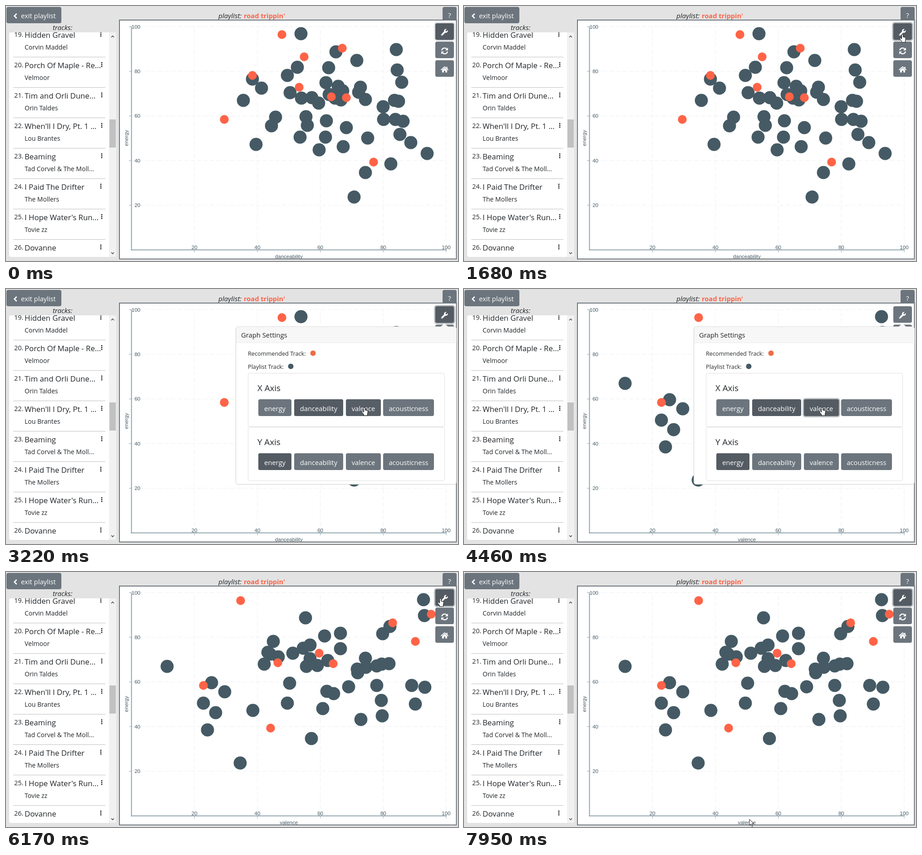
An HTML page for the animation above (8 s loop, 996 px wide and 562 px high).

```html
<!DOCTYPE html>
<html lang="en">
<head>
<meta charset="utf-8">
<title>Playlist graph</title>
<style>
html, body { margin: 0; width: 100%; height: 100%; overflow: hidden; background: #e3e3e3; }
svg { display: block; width: 100vw; height: 100vh; font-family: "Open Sans", "Noto Sans", sans-serif; fill: #212529; }
.chart { font: 11.55px "Liberation Sans", sans-serif; fill: #455a64; }
</style>
</head>
<body>
<svg id="stage" viewBox="0 0 996 562"></svg>
<script>
const LOOP = 8000;
const GREY = '#6c757d', DARK = '#545b62', SLATE = '#455a64', TOMATO = '#ff6347';

// Dot positions on the stage: one shared energy (y), two choices for x.
const playlist = {
  energy: [61, 96, 101, 120, 135, 136, 141, 153, 161, 168, 169, 177, 181, 179, 191, 187, 190, 195, 203, 202, 208, 203, 206, 207, 208,
    210, 214, 222, 245, 244, 250, 250, 253, 254, 264, 263, 268, 283, 289, 289, 291, 301, 305, 310, 317, 325, 348, 367, 421],
  danceability: [650, 860, 727, 773, 642, 711, 862, 620, 543, 872, 705, 732, 563, 781, 626, 742, 777, 712, 651, 674, 523, 725, 792, 738, 856,
    865, 689, 831, 594, 661, 832, 858, 706, 875, 585, 664, 750, 868, 648, 704, 797, 892, 551, 743, 690, 928, 848, 792, 767],
  valence: [920, 922, 660, 846, 737, 830, 702, 589, 670, 655, 737, 577, 582, 632, 670, 600, 792, 709, 569, 844, 355, 828, 686, 817, 662,
    793, 774, 775, 625, 453, 817, 894, 755, 923, 482, 707, 722, 827, 435, 620, 902, 698, 544, 462, 829, 782, 444, 673, 516]
};
const recommended = {
  energy: [63, 93, 112, 153, 179, 200, 202, 250, 344],
  danceability: [608, 741, 657, 543, 646, 717, 750, 481, 810],
  valence: [517, 937, 852, 902, 690, 599, 721, 435, 583]
};

const tracks = [
  ['Hidden Gravel', 'Corvin Maddel'],
  ['Porch Of Maple - Re...', 'Velmoor'],
  ['Tim and Orli Dune...', 'Orin Taldes'],
  ["When'll I Dry, Pt. 1 ...", 'Lou Brantes'],
  ['Beaming', 'Tad Corvel & The Moll...'],
  ['I Paid The Drifter', 'The Mollers'],
  ["I Hope Water's Run...", 'Tovie zz'],
  ['Dovanne', '']
];

// Cursor waypoints: time, x, y
const route = [
  [70, 861, 522], [810, 950, 112], [1210, 966, 62], [2380, 966, 62], [2460, 928, 77],
  [3220, 790, 261], [5000, 789, 261], [5480, 925, 74], [5790, 957, 58], [6250, 957, 58],
  [6620, 625, 496], [6700, 622, 499], [6900, 617, 544], [7150, 634, 546], [7480, 612, 543],
  [7700, 633, 543], [7950, 629, 545], [8000, 629, 545]
];

const text = (x, y, size, content, extra = '') =>
  `<text x="${x}" y="${y}" font-size="${size}" ${extra}>${content.replace(/&/g, '&amp;')}</text>`;
const rect = (x, y, w, h, fill, extra = '') =>
  `<rect x="${x}" y="${y}" width="${w}" height="${h}" fill="${fill}" ${extra}/>`;
const line = (x1, y1, x2, y2, stroke, extra = '') =>
  `<path d="M${x1} ${y1}L${x2} ${y2}" stroke="${stroke}" ${extra}/>`;
const dot = (x, y, r, fill) => `<circle cx="${x}" cy="${y}" r="${r}" fill="${fill}"/>`;
const middle = 'text-anchor="middle"';

const buttons = {};
function button(id, x, y, w, h, content) {
  buttons[id] = { x, y, w, h };
  return `<g id="${id}">
    ${rect(x - 1.4, y - 1.4, w + 2.8, h + 2.8, 'none', 'class="ring" rx="5" stroke="#828a91" stroke-opacity=".55" stroke-width="2.9" opacity="0"')}
    ${rect(x, y, w, h, GREY, 'rx="4"')}
    ${rect(x, y, w, h, DARK, 'class="dark" rx="4" opacity="0"')}
    <g fill="#fff">${content}</g></g>`;
}

function sidebar() {
  const rows = tracks.map(([title, artist], i) => {
    const top = 45 + 67 * i;
    const dotsX = /\.\.\.$/.test(title + artist) || title.endsWith('...') ? 211 : 209;
    return text(18, top + 22.5, 14.4, `${19 + i}.`) +
      text(41, top + 25, 16.8, title) +
      text(41, top + 51, 14, artist) +
      [13, 17, 21].map(y => dot(dotsX, top + y, 1.5, '#212529')).join('') +
      line(16, top + 67.5, 219, top + 67.5, '#bfbfbf');
  }).join('');
  return `<clipPath id="list"><rect x="7" y="58" width="236" height="495" rx="4"/></clipPath>
    <g clip-path="url(#list)">
      ${rect(7, 58, 236, 495, '#fff')}${rows}
      ${rect(227, 58, 16, 495, '#f1f1f1')}${rect(228, 250, 14, 62, '#c1c1c1')}
      <path d="M232 69l3-3 3 3M232 543l3 3 3-3" fill="none" stroke="#505050" stroke-width="1.6"/>
    </g>`;
}

function dots(axis) {
  const draw = (set, r, fill) => set[axis].map((x, i) => dot(x, set.energy[i], r, fill)).join('');
  return `<g id="${axis}Dots">${draw(playlist, 14.4, SLATE)}${draw(recommended, 9.7, TOMATO)}</g>`;
}

function chart() {
  const ticks = [20, 40, 60, 80, 100];
  const toX = v => 276.5 + 6.935 * v, toY = v => 537.5 - 4.92 * v;
  const grid = 'stroke-dasharray="9.6 4.8"', axis = 'stroke-width="2"';
  return `<g class="chart">
    ${rect(250, 31, 742.5, 526.5, '#fff', 'stroke="#6c757d" stroke-width="2"')}
    ${ticks.map(v =>
      line(toX(v), 537, toX(v), 45, '#eceff1', grid) + line(277, toY(v), 970, toY(v), '#eceff1', grid) +
      line(toX(v), 537, toX(v), 543, '#90a4ae') + line(271, toY(v), 277, toY(v), '#90a4ae')).join('')}
    ${line(276.5, 45, 276.5, 538.5, '#90a4ae', axis)}${line(275.5, 537.5, 970.5, 537.5, '#90a4ae', axis)}
    ${dots('danceability')}${dots('valence')}
    ${ticks.map(v => text(toX(v), 536, 11.55, `${v}`, middle) +
      text(296, toY(v) + 4, 11.55, `${v}`, 'text-anchor="end"')).join('')}
    ${text(623.3, 555.5, 11.55, '', middle + ' id="xLabel"')}
    ${text(0, 0, 11.55, 'energy', middle + ' transform="translate(268.5 291) rotate(-90)"')}
  </g>`;
}

const icons = {
  wrench: `<path transform="translate(958.5 50.5) scale(.0295)" d="M488 104L413 178 345 167 334 99 408 24C420 10 410 2 402 3
    310-20 200 70 232 185L19 403c-50 60 30 140 90 90L322 280c110 35 220-70 186-171-2-9-13-12-20-5zM64 472a24 24 0 1 1 .1 0z"/>`,
  refresh: [0, 180].map(a => `<g transform="translate(966.5 99) rotate(${a})">
    <path d="M-6.3-1.2A6.4 6.4 0 0 1 4.6-4.4" fill="none" stroke="#fff" stroke-width="2.3"/><path d="M7.4-7.4V-1.2H1.2z"/></g>`).join(''),
  home: `<path d="M958.5 141l8-7 8 7" fill="none" stroke="#fff" stroke-width="1.8"/>
    <path d="M961 141l5.5-4.8 5.5 4.8v5.5h-3.8v-4h-3.4v4H961zM970.5 134h2.2v5l-2.2-2z"/>`
};

function panel() {
  const choices = [['energy', 556, 73], ['danceability', 635, 108], ['valence', 749, 77], ['acousticness', 831, 112]];
  const card = (axis, y) =>
    rect(533.5, y + .5, 433, 118, '#fff', 'rx="4" stroke="#dfdfdf"') + text(554, y + 40, 18.7, `${axis} Axis`) +
    choices.map(([name, x, w]) => button(axis + name, x, y + 58, w, 37,
      text(x + w / 2, y + 83.5, 14.7, name, middle))).join('');
  return `<g id="panel">
    ${rect(506.5, 83, 486, 347.5, '#fff', 'rx="5" stroke="#ccc"')}
    <path d="M507 118V88q0-4.500 4.500-4.500H988q4.500 0 4.500 4.500V118z" fill="#f7f7f7"/>
    ${line(507, 118.5, 992, 118.500, '#ebebeb')}
    <path d="M957 84l9-8.500 9 8.500z" fill="#f7f7f7"/>
    ${text(518, 107, 14.8, 'Graph Settings')}
    ${text(533, 147, 12.7, 'Recommended Track:')}${dot(676.5, 141.5, 6, '#ee6c45')}
    ${text(533, 176, 12.7, 'Playlist Track:')}${dot(627.5, 170.5, 6, SLATE)}
    ${card('X', 185)}${card('Y', 304)}
  </g>`;
}

const stage = document.getElementById('stage');
stage.innerHTML = `
  ${rect(0, 0, 996, 562, '#e3e3e3')}
  ${rect(1, 2, 121, 36, GREY, 'rx="4"')}
  <path d="M23.500 17l-5 5 5 5" fill="none" stroke="#fff" stroke-width="2.600"/>
  ${text(33, 27, 14.8, 'exit playlist', 'fill="#fff"')}
  ${text(103, 53, 15, 'tracks:', 'font-style="italic"')}
  ${text(468, 27, 15.2, 'playlist:', 'font-style="italic"')}
  ${text(524, 27, 14.6, "road trippin'", `font-weight="700" fill="${TOMATO}"`)}
  ${rect(962, 2, 31, 36, GREY, 'rx="4"')}${text(977.5, 26, 14.8, '?', middle + ' fill="#fff"')}
  ${sidebar()}${chart()}
  ${button('refresh', 946, 78.5, 41, 36.5, icons.refresh)}
  ${button('home', 946, 119.5, 41, 36.5, icons.home)}
  ${button('wrench', 946, 38, 41, 36.5, icons.wrench)}
  ${panel()}
  <g id="cursor" fill="#fff" stroke="#111" stroke-linejoin="round">
    <path id="arrow" d="M0 0V13.500L3.200 10.600 5.500 15.600 7.600 14.700 5.400 9.800H9.600z"/>
    <path id="hand" d="M-1.500 1.500Q-1.500 0 0 0T1.500 1.500V6l4 1q2 .5 2 2.300l-1 4.700V18H-1.500V15.500L-5.500 11q-1-2 .6-2.500t3.400 2z"/>
  </g>`;

const $ = id => document.getElementById(id);
const clamp = v => Math.max(0, Math.min(1, v));
const ramp = (t, start, span) => clamp((t - start) / span);
const show = (node, visible) => { node.style.display = visible ? '' : 'none'; };

function cursorAt(t) {
  const next = Math.max(1, route.findIndex(([time]) => time > t));
  const [t0, x0, y0] = route[next - 1], [t1, x1, y1] = route[next];
  const k = ramp(t, t0, t1 - t0);
  return [x0 + (x1 - x0) * k, y0 + (y1 - y0) * k];
}

function render(t) {
  const [x, y] = cursorAt(t);
  const open = ramp(t, 1700, 130) - ramp(t, 5900, 150);
  const switched = t >= 4460;
  const focus = t < 200 ? 1 - ramp(t, 70, 130)
    : ramp(t, 1510, 120) - ramp(t, 4170, 150) + ramp(t, 5870, 100);

  const dark = {
    wrench: focus,
    Xdanceability: 1 - ramp(t, 4460, 90),
    Xvalence: +switched,
    Yenergy: 1
  };
  const ring = { wrench: t < 200 ? focus * .4 : focus, Xvalence: +switched };

  let pointing = false;
  for (const [id, b] of Object.entries(buttons)) {
    const reachable = /^[XY]/.test(id) ? open > .5 : id === 'wrench' || open < .5;
    const hover = t >= 70 && reachable && x > b.x && x < b.x + b.w && y > b.y && y < b.y + b.h;
    pointing ||= hover;
    const node = $(id);
    node.querySelector('.dark').setAttribute('opacity', Math.max(dark[id] || 0, hover ? .85 : 0));
    node.querySelector('.ring').setAttribute('opacity', ring[id] || 0);
  }

  $('panel').setAttribute('opacity', open);
  show($('panel'), open > 0);
  show($('danceabilityDots'), !switched);
  show($('valenceDots'), switched);
  $('xLabel').textContent = switched ? 'valence' : 'danceability';
  $('cursor').setAttribute('transform', `translate(${x} ${y})`);
  show($('cursor'), t >= 70);
  show($('hand'), pointing);
  show($('arrow'), !pointing);
}

const start = performance.now();
function frame() {
  render((performance.now() - start) % LOOP);
  requestAnimationFrame(frame);
}
frame();
</script>
</body>
</html>
```
